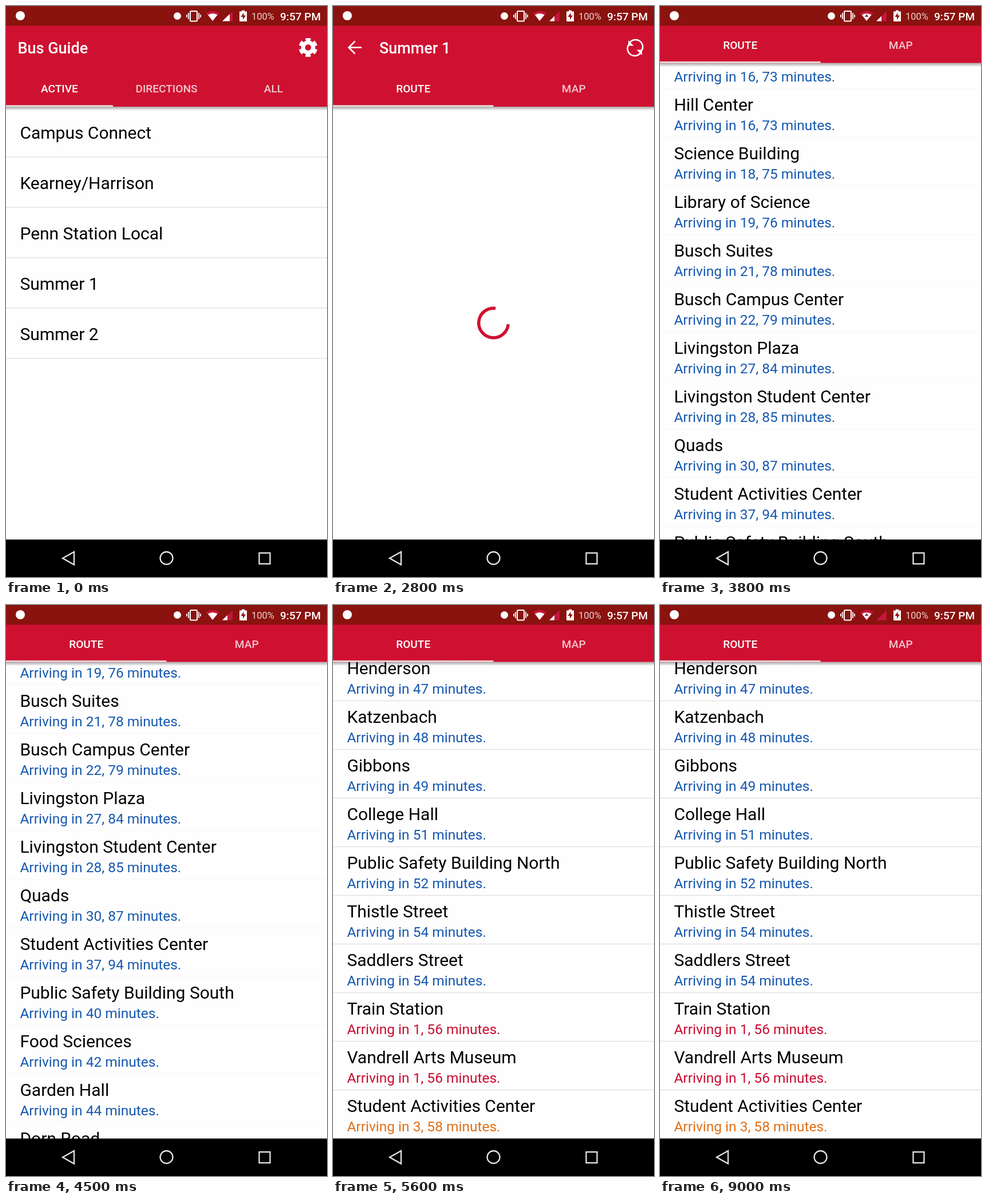
An HTML page that plays this animation: 561x998 px, repeating every 9.2 s.

```html
<!DOCTYPE html>
<html lang="en">
<head>
<meta charset="utf-8">
<title>Bus Guide</title>
<style>
html, body { margin: 0; width: 100%; height: 100%; overflow: hidden; background: #fefefe }
#stage { display: block; width: 561px; height: 998px; font-family: Roboto, sans-serif }
.name { font-size: 30px }
.sub { font-size: 24.5px }
.title { font-size: 27px; font-weight: 500; fill: #fff }
.tab { font-size: 19.1px; font-weight: 500; fill: #fff; text-anchor: middle }
.off { opacity: .76 }
.line { fill: none; stroke: #fff; stroke-width: 2.6 }
.rule { fill: #e1e1e1 }
</style>
</head>
<body>
<svg id="stage" viewBox="0 0 561 998">
  <defs>
    <linearGradient id="shade" x2="0" y2="1">
      <stop stop-opacity=".34"/><stop offset="1" stop-opacity="0"/>
    </linearGradient>
  </defs>
  <g id="home"></g>
  <g id="route"></g>
  <g id="status">
    <rect width="561" height="34.5" fill="#8a120f"/>
    <circle cx="25" cy="17" r="8" fill="#fff"/>
    <circle cx="299.500" cy="17.500" r="6.500" fill="#fff"/>
    <rect x="322" y="9" width="12" height="17.500" rx="1.500" class="line" style="stroke-width:2"/>
    <path d="M319 12v11M337 12v11M316 15v5M340 15v5" class="line" style="stroke-width:1.8"/>
    <path d="M349.500 13Q361 4.500 373 13L361 27Z" fill="#c5163a"/>
    <path d="M353 15.500Q361 10.500 369.500 15.500L361 26Z" fill="#fff"/>
    <path id="traffic" d="M361 14l3.500 5h-7z" fill="#8a3a3a"/>
    <path d="M396 9v17.500h-18z" fill="#c5163a"/>
    <path id="signal" fill="#fff"/>
    <path d="M408 9.500h4v-2h5v2h4v17.500h-13z" fill="#fff"/>
    <path d="M415.500 11.500l-5 7.500h3.500v5l5-7.500h-3.500z" fill="#8a120f"/>
    <text x="429" y="23.500" font-size="16.500" fill="#ecd3d0">100%</text>
    <text x="479" y="24.500" font-size="19.100" font-weight="500" fill="#fff">9:57 PM</text>
  </g>
  <rect y="932.500" width="561" height="66"/>
  <g class="line" style="stroke:#e4e4e4;stroke-width:2.3">
    <path d="M119 954v22.500L99 965.200z"/>
    <circle cx="280.500" cy="965" r="11"/>
    <rect x="442.500" y="956" width="19" height="19"/>
  </g>
</svg>
<script>
const $ = id => document.getElementById(id);
const LOOP = 9200, ROW = 85, HEAD = 177, TOOLBAR = 76.4, LEFT = 24.4, TAP = 400;
const BLUE = '#1758ae', RED = '#c90d30', ORANGE = '#e07018';

// Stops with their arrival times in minutes
const stops = [
  ['Main Hall', 7, 64], ['Stadium', 12, 69], ['Visitor Center', 14, 71], ['Fitness Center', 16, 73],
  ['Hill Center', 16, 73], ['Science Building', 18, 75], ['Library of Science', 19, 76],
  ['Busch Suites', 21, 78], ['Busch Campus Center', 22, 79], ['Livingston Plaza', 27, 84],
  ['Livingston Student Center', 28, 85], ['Quads', 30, 87], ['Student Activities Center', 37, 94],
  ['Public Safety Building South', 40], ['Food Sciences', 42], ['Garden Hall', 44], ['Dorn Road', 45],
  ['Henderson', 47], ['Katzenbach', 48], ['Gibbons', 49], ['College Hall', 51],
  ['Public Safety Building North', 52], ['Thistle Street', 54], ['Saddlers Street', 54],
  ['Train Station', 1, 56], ['Vandrell Arts Museum', 1, 56], ['Student Activities Center', 3, 58]
];
const NORTH = 21, STREET = 22;

const minutes = i => `Arriving in ${stops[i].slice(1).join(', ')} minutes.`;
const tint = m => m < 2 ? RED : m < 6 ? ORANGE : BLUE;
const rule = y => `<rect class="rule" y="${y - .7}" width="561" height="1.4"/>`;
const press = (id, y, h, x) => `<svg id="${id}" y="${y}" width="561" height="${h}" overflow="hidden">
  <rect width="561" height="${h}" fill-opacity=".045"/><circle cx="${x}" cy="${h * .6}" fill-opacity=".04"/></svg>`;

function header(tabs, icons) {
  const w = 561 / tabs.length;
  const labels = tabs.map((s, i) =>
    `<text class="tab ${i ? 'off' : ''}" x="${w * (i + .5)}" y="151">${s}</text>`).join('');
  return `<rect y="176" width="561" height="7" fill="url(#shade)"/>
    <rect y="34" width="561" height="142" fill="#cf1131"/>
    <rect y="173.300" width="${w}" height="2.700" fill="#ecdedf"/>${labels}${icons}`;
}

const gear = `<g transform="translate(528 72.500) rotate(12)" fill="none" stroke="#fff">
  <circle r="8.800" stroke-width="7"/>
  <circle r="13.300" stroke-width="6.400" pathLength="60" stroke-dasharray="6 4"/></g>`;
const half = '<path class="line" d="M-10 -8A12.500 12.500 0 0 1 11.500 5"/><path d="M-12 -13v9.500h9.500z" fill="#fff"/>';
const refresh = `<g transform="translate(528 73)">${half}<g transform="rotate(180)">${half}</g></g>`;
const back = '<path class="line" d="M50 72.500H28M38.500 61.500L27.500 72.500L38.500 83.500"/>';

const routes = ['Campus Connect', 'Kearney/Harrison', 'Penn Station Local', 'Summer 1', 'Summer 2'];
$('home').innerHTML = press('tapRoute', 440, 88, 120) +
  routes.map((s, i) => `<text class="name" x="${LEFT}" y="${231.5 + 88 * i}">${s}</text>${rule(264 + 88 * i)}`).join('') +
  header(['ACTIVE', 'DIRECTIONS', 'ALL'], `<text class="title" x="20.500" y="83">Bus Guide</text>${gear}`);

$('route').innerHTML = `<rect y="34" width="561" height="964" fill="#fefefe"/>
  <path id="spinner" class="line" style="stroke:#cf1131;stroke-width:5.500"/>
  <g id="list">${press('tapNorth', NORTH * ROW, ROW, 200)}${press('tapStreet', STREET * ROW, ROW, 157)}
  ${stops.map(([s, m], i) => `<text class="name" x="${LEFT}" y="${i * ROW + 38}">${s}</text>
    <text class="sub" id="sub${i}" x="${LEFT}" y="${i * ROW + 72}" fill="${tint(m)}">${minutes(i)}</text>${rule((i + 1) * ROW - .5)}`).join('')}</g>
  <g id="bar">${header(['ROUTE', 'MAP'], `${back}<text class="title" x="81" y="83">Summer 1</text>${refresh}`)}</g>`;
const rules = [...$('list').querySelectorAll('.rule')];

const clamp = v => Math.max(0, Math.min(1, v));
const show = (id, on) => $(id).style.display = on ? '' : 'none';
const move = (id, y) => $(id).setAttribute('transform', `translate(0 ${y})`);

const track = [[3200, 0], [3500, 130], [3800, 372], [4000, 500], [4200, 545], [4400, 545],
  [4600, 720], [4800, 1200], [5000, 1468], [5200, 1528], [5400, 1539]];
function scrollAt(t) {
  const i = track.findIndex(p => p[0] > t);
  if (i < 0) return track[track.length - 1][1];
  if (!i) return 0;
  const [a, from] = track[i - 1], [b, to] = track[i];
  return from + (to - from) * (t - a) / (b - a);
}

function ripple(id, t, ...starts) {
  const start = starts.find(s => t >= s && t < s + TAP);
  show(id, start !== undefined);
  if (start === undefined) return;
  const p = (t - start) / TAP;
  $(id).lastElementChild.setAttribute('r', 40 + 750 * p * p);
  $(id).style.opacity = 1 - p ** 3;
}

function spin(t) {
  const k = (t - 2800) / 300;
  const from = 5 + 90 * k + Math.max(0, k) * 160, to = 278 + 300 * Math.min(0, k) + 90 * Math.max(0, k);
  const at = deg => {
    const a = deg * Math.PI / 180;
    return `${280.5 + 25.8 * Math.cos(a)} ${554 + 25.8 * Math.sin(a)}`;
  };
  const end = Math.max(to, from + 15);
  $('spinner').setAttribute('d', `M${at(from)}A25.8 25.8 0 ${end - from > 180 ? 1 : 0} 1 ${at(end)}`);
}

function draw(t) {
  const open = clamp((t - 2200) / 350), loaded = t >= 3000, scroll = scrollAt(t);
  show('route', open > 0);
  $('route').style.opacity = clamp(open * 1.75);
  move('route', 75 * (1 - open) ** 3);
  show('spinner', !loaded);
  spin(t);
  show('list', loaded);
  move('list', HEAD - scroll);
  move('bar', -Math.min(scroll, TOOLBAR));
  const moving = scroll !== scrollAt(t - 100);
  rules.forEach(r => r.style.opacity = moving ? .2 : 1);

  ripple('tapRoute', t, 1900);
  ripple('tapNorth', t, 6600, 8000);
  ripple('tapStreet', t, 6900, 8300);
  $('sub' + NORTH).textContent = t >= 6700 && t < 8100 ? 'Arriving at 10:49 PM.' : minutes(NORTH);
  $('sub' + STREET).textContent = t >= 7000 && t < 8400 ? 'Arriving at 10:51 PM.' : minutes(STREET);

  show('traffic', t >= 3300 && t < 4500 || t >= 6600);
  show('signal', t < 7400);
  const w = t < 2800 ? 13 : 9;
  $('signal').setAttribute('d', `M378 26.500h${w}v${-w * .97}z`);
}

const began = performance.now();
function tick() {
  const t = (performance.now() - began) % LOOP;
  draw(Math.floor(t / 100) * 100);
  requestAnimationFrame(tick);
}
tick();
</script>
</body>
</html>
```
